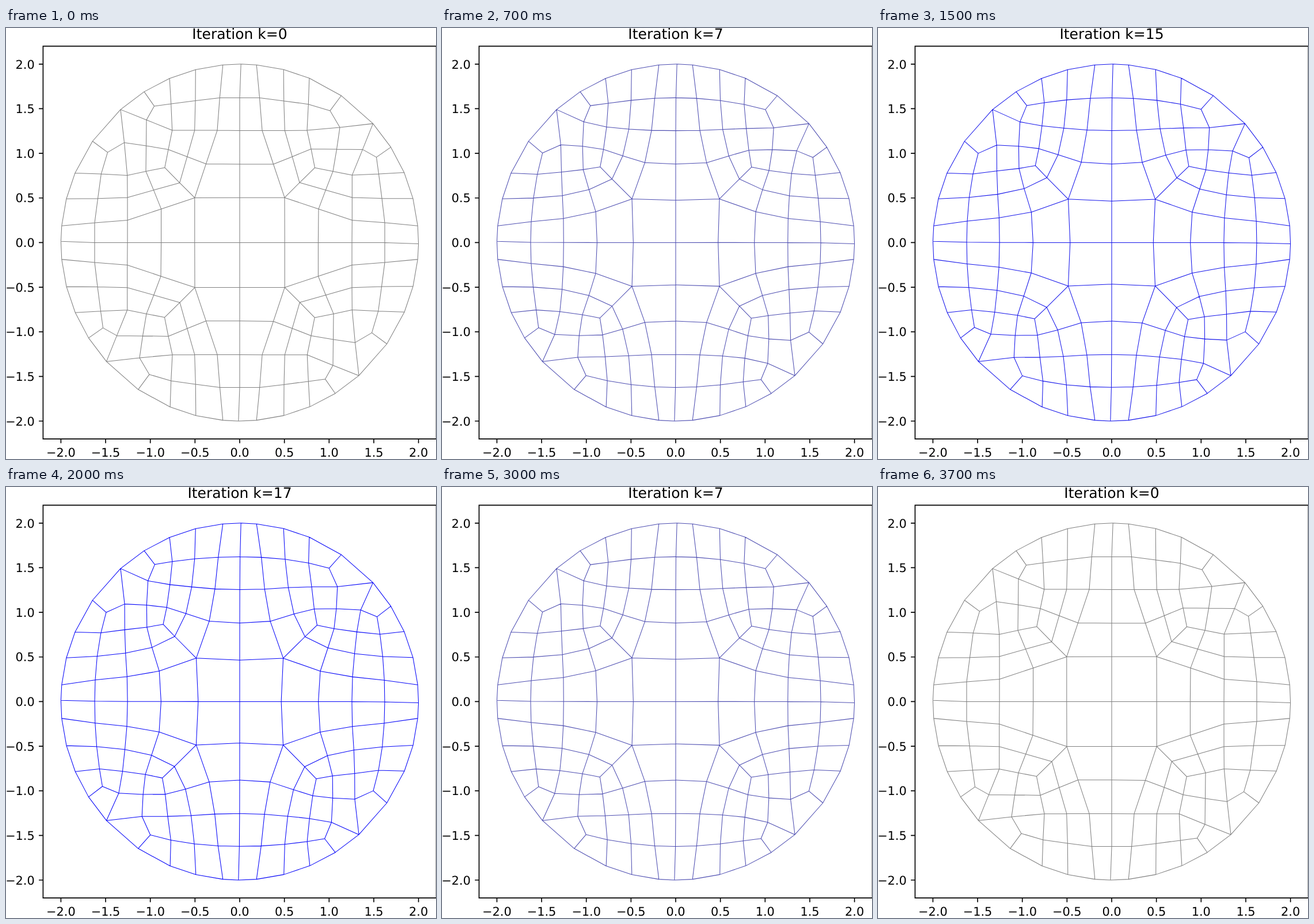
These frames come from a looping animation (747 px wide and 750 px high, 3800 ms). An HTML page:

```html
<!DOCTYPE html>
<html lang="en">
<head>
<meta charset="utf-8">
<title>Mesh smoothing</title>
<style>
  html, body { margin: 0; width: 100%; height: 100%; overflow: hidden; background: #fff; }
  svg { display: block; }
  text { font: 20.83px "DejaVu Sans", sans-serif; text-rendering: geometricPrecision; }
  #title { font-size: 25px; text-anchor: middle; }
  #axes { fill: none; stroke: #000; stroke-width: 1.67; }
  #mesh { fill: none; stroke-width: 1.04; stroke-linejoin: round; }
</style>
</head>
<body>
<svg width="747" height="750" viewBox="0 0 747 750">
  <g id="mesh" transform="translate(406 373.4)">
    <path id="quarter"/>
    <use href="#quarter" transform="rotate(90)"/>
    <use href="#quarter" transform="rotate(180)"/>
    <use href="#quarter" transform="rotate(270)"/>
  </g>
  <path id="axes"/>
  <g id="labels"></g>
  <text id="title" x="406" y="19.4"></text>
</svg>
<script>
const CX = 406, CY = 373.4, UNIT = 155.3, RADIUS = 2 * UNIT;
const STEPS = 18, FRAME_MS = 100, LAMBDA = 0.2;
const $ = id => document.getElementById(id);

// Axes, ticks and tick labels
const left = 64.4, right = 747.5, top_ = 31.7, bottom = 715.1;
let axes = `M${left} ${top_}H${right}V${bottom}H${left}Z`;
function label(str, x, y, anchor) {
  const el = document.createElementNS("http://www.w3.org/2000/svg", "text");
  el.setAttribute("x", x);
  el.setAttribute("y", y);
  el.setAttribute("text-anchor", anchor);
  el.textContent = str;
  $("labels").append(el);
}
for (let v = -2; v <= 2; v += 0.5) {
  const str = v.toFixed(1).replace("-", "\u2212");
  const x = CX + v * UNIT, y = CY - v * UNIT;
  axes += `M${x} ${bottom}v7.3M${left} ${y}h-7.3`;
  label(str, x, 745.6, "middle");
  label(str, 49.7, y + 7.7, "end");
}
$("axes").setAttribute("d", axes);

// One quarter of the mesh, in pixels from the centre with y up
const inner = {
  A1: [0, 78.2], A2: [0, 136.4], A3: [0, 195], A4: [0, 252],
  C: [78, 78.2], D1: [58.5, 136.4], D2: [124, 163], T1: [137, 58.5],
  V: [91.3, 149.5], U: [149.3, 91.3], F: [104, 104.3], E: [130.5, 130.2],
  G1: [39, 195], G2: [78.3, 195], G3: [117, 195.3], G4: [174, 200.5],
  H1: [34.5, 252], H2: [76.7, 246.5], H3: [119.3, 240.7], H4: [157, 229.5],
  M1: [168.5, 162.5], M2: [162, 124], R1: [213.5, 162], R2: [237.5, 148.5],
  S1: [195.3, 117.3], S2: [241.5, 119.3], S3: [195.3, 78.3],
  S4: [247, 77], S5: [195.3, 39], S6: [252, 34.7]
};
const rim = {};
[0.4, 5.4, 14.2, 22.9, 34.6, 48.2, 57.7, 66.9, 75.7, 84.6].forEach((deg, i) => {
  const a = deg * Math.PI / 180;
  rim["B" + i] = [RADIUS * Math.sin(a), RADIUS * Math.cos(a)];
});

// Mesh lines; a prime marks the node of the next quarter clockwise
const chains = [
  "O A1 A2 A3 A4 B0", "A1 C A1'",
  "A2 D1 V D2 M1 R1 R2 B6", "A3 G1 G2 G3 G4 B5", "A4 H1 H2 H3 H4 B4",
  "C D1 G1 H1 B1", "F V G2 H2 B2", "E D2 G3 H3 B3", "M2 M1 G4 H4",
  "C F E M2 S1 S2 B7", "C T1 S5 S6 B9", "F U S3 S4 B8",
  "A2' T1 U M2", "A3' S5 S3 S1 R1 B5", "A4' S6 S4 S2 R2",
  "B0 B1 B2 B3 B4 B5 B6 B7 B8 B9 B0'"
].map(line => line.split(" ").map(s => ({ id: s.replace("'", ""), turn: s.endsWith("'") ? 1 : 0 })));

function turned([x, y], turn) {
  return turn > 0 ? [y, -x] : turn < 0 ? [-y, x] : [x, y];
}

const links = {};
function link(a, b) {
  (links[a.id] ||= []).push({ id: b.id, turn: b.turn - a.turn });
}
for (const chain of chains) {
  for (let i = 1; i < chain.length; i++) {
    link(chain[i - 1], chain[i]);
    link(chain[i], chain[i - 1]);
  }
}

// Damped Laplacian smoothing with a fixed rim
function smooth(nodes) {
  const next = { ...nodes };
  for (const id in inner) {
    const near = links[id].map(n => turned(nodes[n.id], n.turn));
    next[id] = nodes[id].map((v, axis) => {
      const mean = near.reduce((sum, p) => sum + p[axis], 0) / near.length;
      return v + LAMBDA * (mean - v);
    });
  }
  return next;
}

function meshPath(nodes) {
  return chains.map(chain => "M" + chain.map(n => {
    const [x, y] = turned(nodes[n.id], n.turn);
    return `${x.toFixed(2)} ${(-y).toFixed(2)}`;
  }).join("L")).join("");
}

const paths = [];
let nodes = { O: [0, 0], ...inner, ...rim };
for (let k = 0; k <= STEPS; k++) {
  paths.push(meshPath(nodes));
  nodes = smooth(nodes);
}

function show(k) {
  const mix = k / STEPS;
  const grey = Math.round(128 * (1 - mix)), blue = Math.round(128 + 127 * mix);
  $("quarter").setAttribute("d", paths[k]);
  $("mesh").style.stroke = `rgb(${grey}, ${grey}, ${blue})`;
  $("title").textContent = "Iteration k=" + k;
}

// Count up to the last step, then back down
const FRAMES = 2 * (STEPS + 1);
const start = performance.now();
let shown = -1;
function tick() {
  const i = Math.floor((performance.now() - start) / FRAME_MS) % FRAMES;
  const k = Math.min(i, FRAMES - 1 - i);
  if (k !== shown) show(shown = k);
  requestAnimationFrame(tick);
}
tick();
</script>
</body>
</html>
```
